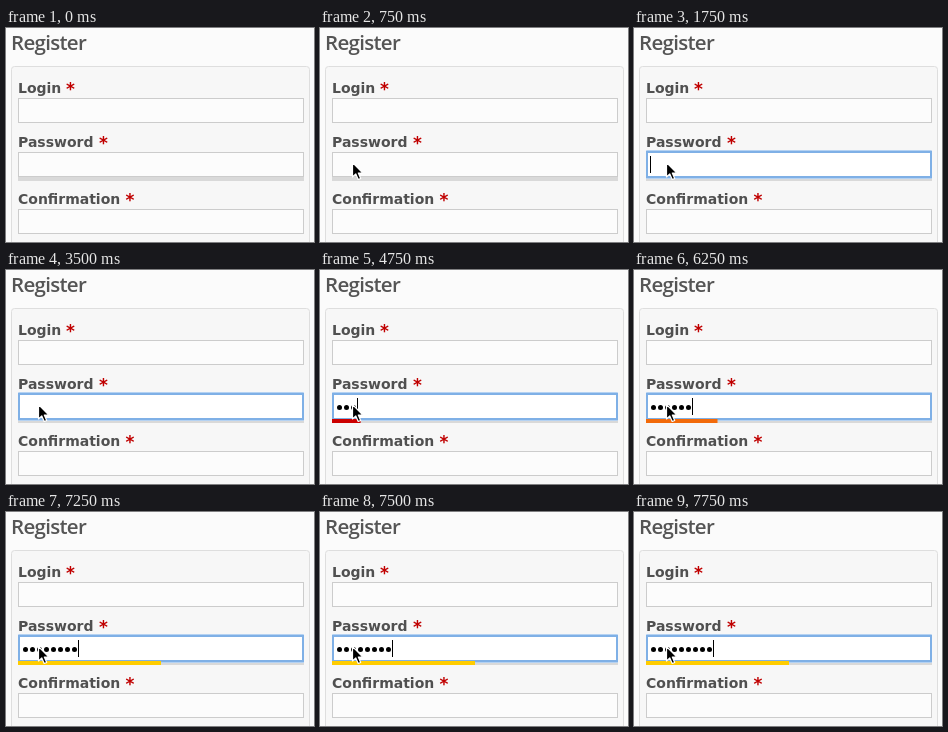
Write an HTML page that moves like this. It is 308 px wide and 214 px high and loops after 8000 ms.

```html
<!DOCTYPE html>
<html lang="en">
<head>
<meta charset="utf-8">
<title>Register form</title>
<style>
  html, body { margin: 0; width: 100%; height: 100%; overflow: hidden; background: #fbfbfb; }
  svg { display: block; width: 308px; height: 214px; }
  .title { font: 600 20.5px "Open Sans", sans-serif; letter-spacing: -.7px; fill: #555; }
  .label { font: bold 14px "DejaVu Sans", sans-serif; fill: #505050; }
  .star { font-size: 17px; fill: #c00000; }
  .field { fill: #fcfcfc; stroke: #ccc; }
</style>
</head>
<body>
<svg viewBox="0 0 308 214">
  <text class="title" x="5" y="22">Register</text>
  <rect x="5.5" y="38.5" width="298" height="200" rx="3" fill="#f7f7f7" stroke="#dedede"/>
  <g id="form"></g>
  <rect x="12" y="149" width="286" height="4" fill="#d9d9d9"/>
  <g id="focus">
    <rect x="12" y="122" width="286" height="29" rx="1" fill="#b5d2f2"/>
    <rect x="13" y="124" width="284" height="25" fill="#fff" stroke="#7fb0e6" stroke-width="2"/>
  </g>
  <rect id="meter" x="12" y="149" height="4"/>
  <g id="dots"></g>
  <rect id="caret" y="128" width="1" height="17"/>
  <path id="pointer" d="M0 0V14.5L3.3 11.4L5.7 17L8.2 16L5.8 10.6H10.4Z"
        stroke="#fff" stroke-width="1.2" stroke-linejoin="round"/>
</svg>
<script>
const NS = "http://www.w3.org/2000/svg";
const LOOP = 8000;
const MAX_DOTS = 9;
const PITCH = 7;
const byId = id => document.getElementById(id);

function add(parent, tag, attrs, text = "") {
  const el = document.createElementNS(NS, tag);
  for (const key in attrs) el.setAttribute(key, attrs[key]);
  el.textContent = text;
  return parent.appendChild(el);
}

// label, field top, x of the required mark
[["Login", 70, 60], ["Password", 124, 93], ["Confirmation", 181, 119.5]].forEach(([name, top, starX]) => {
  const form = byId("form");
  add(form, "text", { class: "label", x: 12, y: top - 5 }, name);
  add(form, "text", { class: "label star", x: starX, y: top - 3 }, "*");
  add(form, "rect", { class: "field", x: 12.5, y: top + .5, width: 285, height: 24 });
});

const dots = Array.from({ length: MAX_DOTS }, (_, i) =>
  add(byId("dots"), "circle", { cx: 19.5 + PITCH * i, cy: 137.5, r: 2.5 }));

// Each track is a list of [start time, value]; values hold until the next step.
const tracks = {
  pointer: [[0, null], [250, [67.5, 70.5]], [500, [31.5, 132]], [750, [32.5, 134.5]]],
  focus: [[0, false], [1750, true]],
  caret: [[0, false], [1750, true], [2500, false], [3000, true], [3500, false],
          [4000, true], [5250, false], [5750, true]],
  typed: [[0, 0], [4000, 1], [4250, 2], [4750, 3], [6000, 4], [6250, 6],
          [6750, 7], [7250, 8], [7750, 9]],
  meterEnd: [[0, 12], [4250, 15], [4500, 40.6], [6000, 54], [6250, 83.5], [6750, 97], [7000, 155]],
  meterColor: [[0, "#c00"], [6000, "#f26a0a"], [6750, "#fc0"]]
};

const at = (track, time) => track.findLast(([start]) => start <= time)[1];
const show = (el, visible) => el.setAttribute("visibility", visible ? "visible" : "hidden");

function draw(time) {
  const state = {};
  for (const name in tracks) state[name] = at(tracks[name], time);

  show(byId("focus"), state.focus);
  show(byId("caret"), state.caret);
  byId("caret").setAttribute("x", 16 + PITCH * state.typed);
  dots.forEach((dot, i) => show(dot, i < state.typed));

  byId("meter").setAttribute("width", state.meterEnd - 12);
  byId("meter").setAttribute("fill", state.meterColor);

  show(byId("pointer"), state.pointer);
  if (state.pointer) byId("pointer").setAttribute("transform", `translate(${state.pointer})`);
}

const begin = performance.now();
function tick() {
  draw((performance.now() - begin) % LOOP);
  requestAnimationFrame(tick);
}
tick();
</script>
</body>
</html>
```
